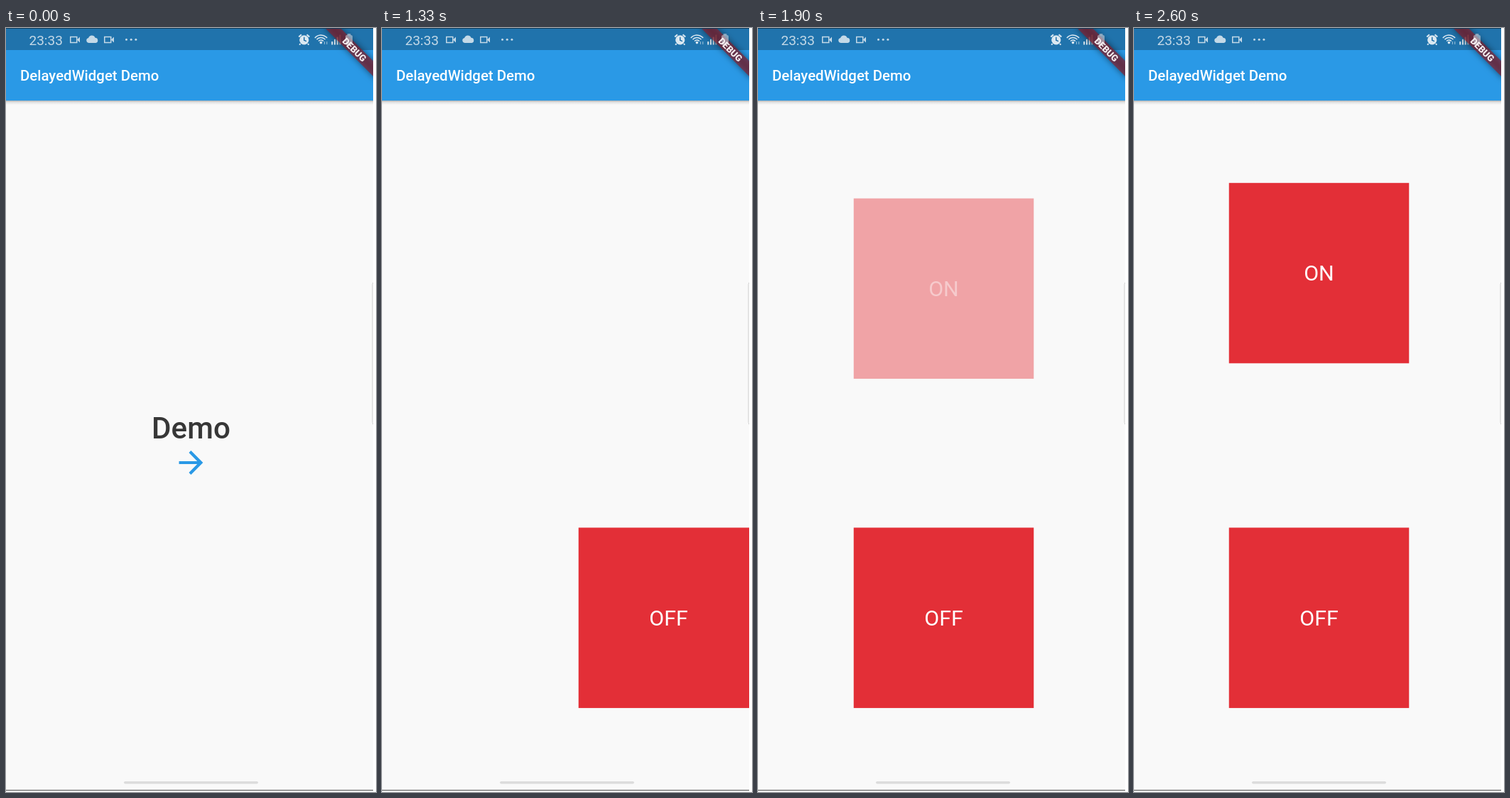
Animation, 521 px wide and 1074 px high, one loop 3310 ms. Source, as an HTML page with a canvas:

```html
<!DOCTYPE html>
<html lang="en">
<head>
<meta charset="utf-8">
<title>DelayedWidget Demo</title>
<style>
  html, body { margin: 0; width: 100%; height: 100%; overflow: hidden; background: #fff; }
  canvas { display: block; }
</style>
</head>
<body>
<canvas id="stage" width="521" height="1074"></canvas>
<script>
const ctx = document.getElementById('stage').getContext('2d');
const LOOP = 3310, START = 1000, RELEASE = 330;
const PAGE = 521, VIEW_W = 517, VIEW_H = 1072, MID = PAGE / 2;
const DP = PAGE / 411;
const BOX = 200 * DP;
const BLUE = '#2a99e6', RED = '#e32f37', PAPER = '#f9f9f9', STATUS = '#c4d9e7';
const ARROW = new Path2D('M12 4l-1.41 1.41L16.17 11H4v2h12.17l-5.58 5.59L12 20l8-8z');
const CLOUD = new Path2D('M116.5 21a3.6 3.6 0 0 1-.4-7.1a5 5 0 0 1 9.4-.2a3.7 3.7 0 0 1 .9 7.3z');

const clamp = v => Math.max(0, Math.min(1, v));

function rect(x, y, w, h, color) {
  ctx.fillStyle = color;
  ctx.fillRect(x, y, w, h);
}

function pill(x, y, w, h, r, color) {
  ctx.fillStyle = color;
  ctx.beginPath();
  ctx.roundRect(x, y, w, h, r);
  ctx.fill();
}

function dot(x, y, r, color) {
  ctx.fillStyle = color;
  ctx.beginPath();
  ctx.arc(x, y, r, 0, Math.PI * 2);
  ctx.fill();
}

function line(color, width, ...pts) {
  ctx.strokeStyle = color;
  ctx.lineWidth = width;
  ctx.beginPath();
  pts.forEach(([x, y]) => ctx.lineTo(x, y));
  ctx.stroke();
}

function text(str, x, y, size, weight, color, align = 'center') {
  ctx.font = `${weight} ${size}px Roboto, sans-serif`;
  ctx.textAlign = align;
  ctx.fillStyle = color;
  ctx.fillText(str, x, y);
}

// Time since the swipe began, held to 30 pictures per second.
function stepTime(t) {
  const at = n => Math.round(n * 10 / 3) * 10;
  let n = Math.floor((t + 4) * 3 / 100);
  if (at(n) > t) n--;
  return n < 2 ? 0 : at(n);
}

// Distance of the second page from rest: finger drag, then an overdamped spring.
function pageOffset(ms) {
  if (ms < RELEASE) {
    const u = ms / RELEASE, d = RELEASE / 1000;
    const from = 519.4, to = 143, v0 = -250 * d, v1 = -870 * d;
    return from + v0 * u + (3 * (to - from) - 2 * v0 - v1) * u * u
      + (2 * (from - to) + v0 + v1) * u * u * u;
  }
  const s = (ms - RELEASE) / 1000;
  return 176 * Math.exp(-9.07 * s) - 33 * Math.exp(-22.04 * s);
}

function button(label, x, y, alpha) {
  ctx.globalAlpha = alpha;
  rect(x - BOX / 2, y, BOX, BOX, RED);
  text(label, x, y + BOX / 2 + 10.6, 24 * DP, 400, '#fff');
  ctx.globalAlpha = 1;
}

function intro(x) {
  text('Demo', x, 577, 42.2, 500, '#373737');
  const k = 40 * DP / 24;
  ctx.save();
  ctx.translate(x - 12 * k, 611 - 12 * k);
  ctx.scale(k, k);
  ctx.fillStyle = BLUE;
  ctx.fill(ARROW);
  ctx.restore();
}

function camera(x) {
  ctx.strokeStyle = STATUS;
  ctx.lineWidth = 1.5;
  ctx.strokeRect(x + 0.75, 12.5, 9, 8);
  ctx.fillStyle = STATUS;
  ctx.beginPath();
  ctx.moveTo(x + 10, 16.5);
  ctx.lineTo(x + 14, 12.5);
  ctx.lineTo(x + 14, 20.5);
  ctx.fill();
}

function statusIcons() {
  text('23:33', 32.5, 23.5, 19, 400, STATUS, 'left');
  camera(90);
  ctx.fillStyle = STATUS;
  ctx.fill(CLOUD);
  camera(138);
  for (let i = 0; i < 3; i++) dot(169.5 + i * 6.7, 16.3, 1.5, STATUS);

  const lit = '#dbe8f1';
  dot(419.8, 16.8, 6.6, lit);
  line(lit, 2, [412.3, 12.5], [416, 9.2]);
  line(lit, 2, [427.3, 12.5], [423.6, 9.2]);
  line(lit, 2, [414.5, 22], [413.3, 23.8]);
  line(lit, 2, [425.1, 22], [426.3, 23.8]);
  line('#1f6fa8', 1.5, [419.8, 12.8], [419.8, 17.2], [423, 18.6]);

  ctx.strokeStyle = lit;
  ctx.lineWidth = 1.5;
  for (const r of [4.5, 8, 11.5]) {
    ctx.beginPath();
    ctx.arc(443.5, 21.5, r, -Math.PI * 0.77, -Math.PI * 0.23);
    ctx.stroke();
  }
  dot(443.5, 20.6, 1.8, lit);
  line('#8fb8d4', 1.2, [448.5, 19], [448.5, 23]);
  line('#8fb8d4', 1.2, [451.8, 19], [451.8, 23]);

  for (let i = 0; i < 4; i++) {
    const h = 4.5 + i * 3.2;
    rect(458.3 + i * 3.7, 23.5 - h, 2, h, i < 3 ? lit : '#a3bccb');
  }
}

function battery() {
  const c = 'rgba(205,210,220,.6)';
  pill(480.5, 8, 5, 2.5, 1, c);
  pill(478, 10, 10, 14, 2, c);
}

function banner() {
  const y = 28 * DP, w = 80 * DP, h = 12 * DP;
  ctx.save();
  ctx.translate(PAGE, 0);
  ctx.rotate(Math.PI / 4);
  ctx.save();
  ctx.shadowColor = 'rgba(0,0,0,.5)';
  ctx.shadowBlur = 10;
  ctx.shadowOffsetX = 2000;
  // Local shift that cancels the shadow's screen offset.
  const k = 2000 * Math.SQRT1_2;
  rect(-w / 2 - k, y + k, w, h, '#000');
  ctx.restore();
  rect(-w / 2, y, w, h, 'rgba(183,28,28,.4)');
  rect(-w / 2, y, w, h, 'rgba(115,28,50,.4)');
  ctx.restore();
  battery();
  ctx.save();
  ctx.translate(PAGE, 0);
  ctx.rotate(Math.PI / 4);
  text('DEBUG', 0, y + h / 2 + 4.6, 10.2 * DP, 900, '#f6eef0');
  ctx.restore();
}

function chrome() {
  const shade = ctx.createLinearGradient(0, 102, 0, 108);
  shade.addColorStop(0, 'rgba(0,0,0,.28)');
  shade.addColorStop(0.4, 'rgba(0,0,0,.09)');
  shade.addColorStop(1, 'rgba(0,0,0,0)');
  rect(0, 102, PAGE, 6, shade);
  rect(0, 31, PAGE, 71, BLUE);
  rect(0, 0, PAGE, 31, '#2073ac');
  text('DelayedWidget Demo', 20, 74, 20.4, 500, '#fff', 'left');
  statusIcons();
  banner();

  pill(166, 1059, 189, 3.6, 1.8, '#dcdcdc');
  ctx.strokeStyle = '#cfcfcf';
  ctx.lineWidth = 1;
  ctx.beginPath();
  ctx.roundRect(516, 356.5, 12, 202, 4);
  ctx.stroke();
  rect(0, 0, VIEW_W, 1, '#123c59');
  rect(0, VIEW_H - 1, VIEW_W, 1, '#4a4a4a');
}

function draw(time) {
  const t = time % LOOP;
  rect(0, 0, 521, 1074, '#fff');
  ctx.save();
  ctx.beginPath();
  ctx.rect(0, 0, VIEW_W, VIEW_H);
  ctx.clip();
  rect(0, 0, VIEW_W, VIEW_H, PAPER);
  if (t < START) {
    intro(MID);
  } else {
    const ms = stepTime(t - START);
    const x = pageOffset(ms);
    const p = clamp((ms - 558) / 800);
    intro(MID + x - PAGE);
    if (p > 0) button('ON', MID + x, 217.8 + 30 * DP * (1 - p), p);
    button('OFF', MID + x, 702.4, 1);
  }
  chrome();
  ctx.restore();
}

const begin = performance.now();
function tick() {
  draw(performance.now() - begin);
  requestAnimationFrame(tick);
}
tick();
</script>
</body>
</html>
```
